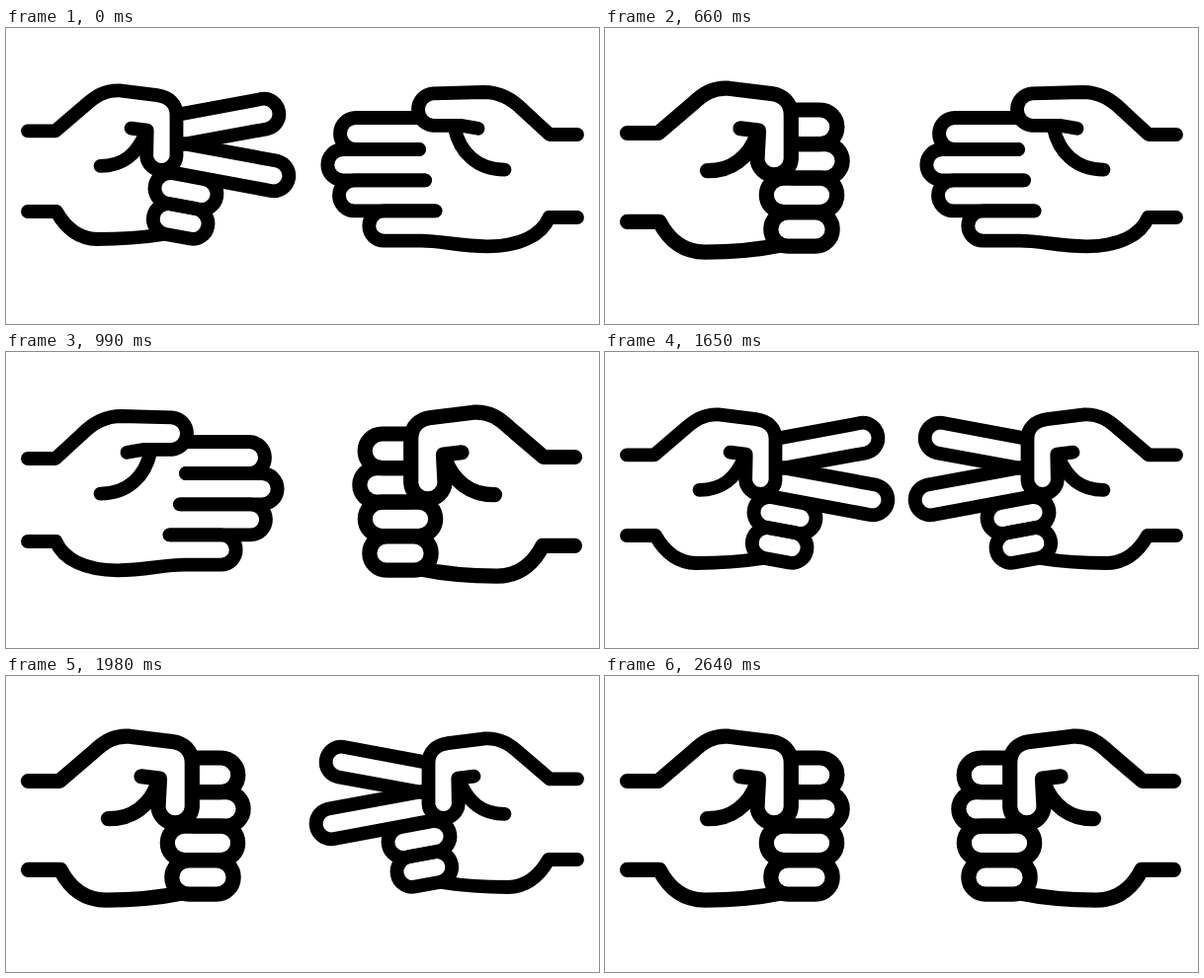
Animation of 600x300 px, one loop 2970 ms. Source, as an HTML page:

```html
<!DOCTYPE html>
<html lang="en">
<head>
<meta charset="utf-8">
<title>Rock, paper, scissors</title>
<style>
  html, body { margin: 0; width: 100%; height: 100%; overflow: hidden; background: #fff; }
  svg { display: block; width: 100vw; height: 100vh; }
  path { fill: none; stroke: #000; stroke-linecap: round; stroke-linejoin: round; }
</style>
</head>
<body>
<svg id="stage" viewBox="0 0 600 300"></svg>
<script>
  const STEP = 330;
  // Each round: left hand, right hand
  const ROUNDS = ['SP', 'SR', 'RP', 'PR', 'PS', 'SS', 'RS', 'PP', 'RR'];

  // Outline of a finger between two tip centres
  function pill(x1, y1, x2, y2, r) {
    const len = Math.hypot(x2 - x1, y2 - y1);
    const nx = -(y2 - y1) / len * r, ny = (x2 - x1) / len * r;
    return `M${x1 - nx} ${y1 - ny}L${x2 - nx} ${y2 - ny}` +
      `A${r} ${r} 0 0 1 ${x2 + nx} ${y2 + ny}L${x1 + nx} ${y1 + ny}` +
      `A${r} ${r} 0 0 1 ${x1 - nx} ${y1 - ny}Z`;
  }

  // Finger open at the knuckle side
  function finger(x1, x2, x3, top, bottom) {
    const r = (bottom - top) / 2;
    return `M${x1} ${top}H${x2}A${r} ${r} 0 0 1 ${x2} ${bottom}H${x3}`;
  }

  const HANDS = {
    R: { width: 15.2, mirror: 598, parts: [
      'M22.5 106.5H54L89 76.5C99 67 109 60 125 61.2L168 66.5C180 68 188.3 76 188.3 88V133' +
        'A17.2 17.2 0 0 1 154 133L155.5 104L137 101.8',
      'M103.5 144.7C128 145 146 131 154 108',
      finger(189, 217.5, 189, 83, 117.7),
      finger(189, 223, 189, 117.7, 152),
      pill(180.5, 169.3, 217.5, 169.3, 17.2),
      pill(185, 204, 213, 204, 17.2),
      'M22.5 196.3H55C65 216 80 227 101 227.2C128 227 154 225 178 220'
    ] },
    P: { width: 13.8, mirror: 600, parts: [
      'M22 108H50L76 84C88 72 100 65 117 65L168 66.3A16.3 16.3 0 0 1 168 98.8H140L122.5 101.8',
      'M95.5 143.6C124 143.6 141 125 146 102',
      finger(184, 246, 182, 91, 123),
      finger(182, 259, 176, 123, 154.3),
      finger(176, 247.5, 165.5, 154.3, 185.3),
      finger(165.5, 217.5, 180, 185.3, 215.7) +
        'C160 215.7 140 221.3 113 221.3C80 221.3 58 210 50.5 192H22'
    ] },
    S: { width: 13.8, mirror: 600, parts: [
      'M22 104.3H50L80 78.5C90 69.5 99 62.8 115 63.3L153 68.2C165 70 172.5 77 172.5 88V130' +
        'A15.2 15.2 0 0 1 142.2 130L142.7 103.6L126.5 101.6',
      'M95.5 139.8C118 139.8 132 129 141.5 106',
      'M173 87.9L259.2 71.8A15.5 15.5 0 0 1 264.8 102.2L173 119',
      'M173 116L274.8 134.8A15.5 15.5 0 0 1 269.2 165.2L170 146.8',
      pill(166, 162.5, 198, 168.5, 15.5),
      pill(164.3, 193.7, 189, 198.3, 15.5),
      'M22 186H51C60 202 73 213.6 92 214C115 214 135 213 158 209.3'
    ] }
  };

  const stage = document.getElementById('stage');
  const NS = stage.namespaceURI;

  function addHand(kind, flip) {
    const hand = HANDS[kind];
    const g = document.createElementNS(NS, 'g');
    if (flip) g.setAttribute('transform', `matrix(-1 0 0 1 ${hand.mirror} 0)`);
    for (const d of hand.parts) {
      const p = document.createElementNS(NS, 'path');
      p.setAttribute('d', d);
      p.setAttribute('stroke-width', hand.width);
      g.append(p);
    }
    stage.append(g);
    return g;
  }

  const sides = [false, true].map(flip =>
    Object.fromEntries(Object.keys(HANDS).map(k => [k, addHand(k, flip)])));

  function show(round) {
    sides.forEach((set, i) => {
      for (const k in set) set[k].style.display = k === round[i] ? '' : 'none';
    });
  }

  const start = performance.now();
  function tick() {
    const t = performance.now() - start;
    show(ROUNDS[Math.floor(t / STEP) % ROUNDS.length]);
    requestAnimationFrame(tick);
  }
  tick();
</script>
</body>
</html>
```
